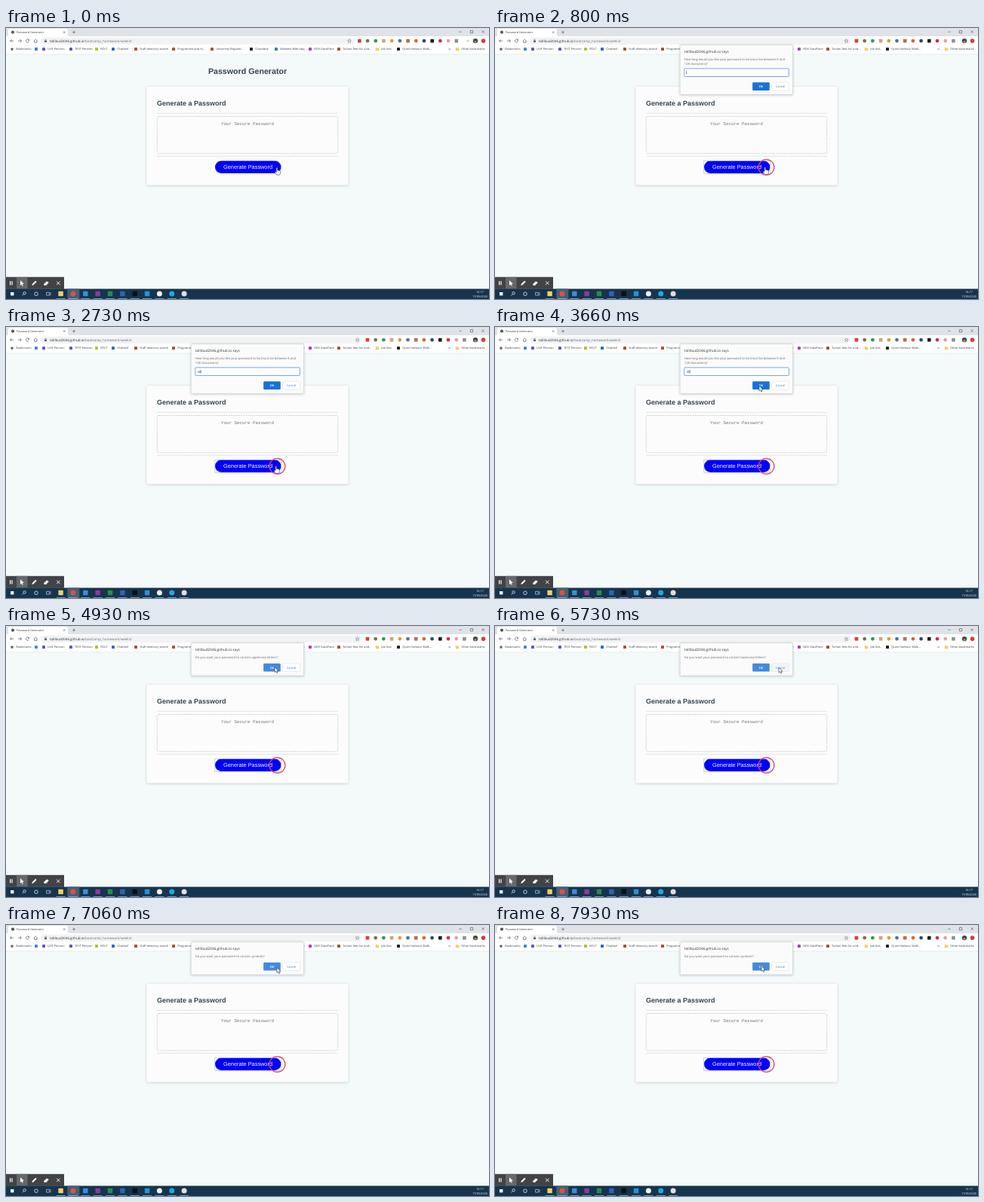
These frames come from a looping animation (640x360 px, 8 s). An HTML page:

```html
<!DOCTYPE html>
<html lang="en">
<head>
<meta charset="utf-8">
<title>Password Generator</title>
<style>
html, body { margin: 0; width: 100%; height: 100%; overflow: hidden; background: #f4f9fa; }
svg { display: block; width: 100vw; height: 100vh; text-rendering: geometricPrecision; }
text { font-family: "Open Sans", "Noto Sans", sans-serif; }
.arial { font-family: "Liberation Sans", Arial, sans-serif; }
.mono { font-family: "Liberation Mono", monospace; }
</style>
</head>
<body>
<svg id="stage" viewBox="0 0 640 360" xmlns="http://www.w3.org/2000/svg">
  <defs>
    <filter id="soft" x="-10%" y="-15%" width="120%" height="140%">
      <feDropShadow dx="0" dy="0.7" stdDeviation="1.6" flood-color="#33444c" flood-opacity=".28"/>
    </filter>
  </defs>
  <rect width="640" height="360" fill="#f4f9fa"/>
  <g id="page">
    <text class="arial" x="320" y="61" font-size="10.67" font-weight="700" text-anchor="middle" fill="#35434d">Password Generator</text>
    <rect x="186.5" y="78" width="267" height="130.5" rx="1.6" fill="#fcfcfc" filter="url(#soft)"/>
    <text class="arial" x="200" y="103" font-size="9" font-weight="700" fill="#35434d">Generate a Password</text>
    <path d="M200 113.3H440M200 170.3H440" stroke="#cdd2d5" stroke-width=".6"/>
    <rect x="200.3" y="117.5" width="239.4" height="49.2" rx="2" fill="#fcfcfc" stroke="#b9bdc0" stroke-width=".7" stroke-dasharray="2 1.3"/>
    <text class="mono" x="320" y="128.7" font-size="5.85" text-anchor="middle" fill="#747474">Your Secure Password</text>
    <rect x="277" y="176.5" width="87.5" height="16.5" rx="8.25" fill="#0000fa"/>
    <text class="arial" x="320.5" y="187.2" font-size="7.36" text-anchor="middle" fill="#fff">Generate Password</text>
    <g id="press" fill="none">
      <rect x="276.8" y="176.3" width="88" height="17" stroke="#9dbbe8" stroke-width=".6"/>
      <circle cx="359.5" cy="185" r="10.4" stroke="#e2485c" stroke-width="1.3"/>
    </g>
  </g>
  <g id="browser">
    <rect width="640" height="11.5" fill="#dfe2e7"/>
    <path d="M1 11.5Q3 11.5 3 9V3Q3 1 5 1H80Q82 1 82 3V9Q82 11.5 84 11.5Z" fill="#fff"/>
    <rect y="11" width="640" height="23.7" fill="#fff"/>
    <path d="M0 34.8H640" stroke="#dfe2e4" stroke-width=".6"/>
    <circle cx="9" cy="5.6" r="2.1" fill="#53585d"/>
    <text x="14" y="7.1" font-size="3.8" fill="#3c4043">Password Generator</text>
    <path d="M76 4.4l2.4 2.4m0-2.4l-2.4 2.4M90 3.7v3.8M88.1 5.6h3.8M600.3 5.2h3.4M615.4 3.5h3.3v3.3h-3.3zM630.5 3.4l3.3 3.3m0-3.3l-3.3 3.3" fill="none" stroke="#4b4f53" stroke-width=".6"/>
    <rect id="omnibox" x="46" y="12.4" height="9.5" rx="4.75" fill="#f1f3f4"/>
    <path d="M10 17H5.5m2-2l-2 2 2 2M16 17h4.5m-2-2l2 2-2 2M30.3 15.8a2.1 2.1 0 1 0 .2 2M30.6 14.8v1.6H29M37 17.2l2.3-2.2 2.3 2.2M37.7 16.7v2.6h3.2v-2.6" fill="none" stroke="#5f6368" stroke-width=".75"/>
    <rect x="51" y="16.4" width="3" height="2.6" rx=".3" fill="#5f6368"/>
    <path d="M51.7 16.5v-.7a.8 .8 0 0 1 1.6 0v.7" fill="none" stroke="#5f6368" stroke-width=".5"/>
    <text x="58" y="18.6" font-size="4.45" fill="#6b7075"><tspan fill="#2b2e31">tollibud2046.github.io</tspan>/bootcamp_homework/week3/</text>
    <g id="tools"></g>
    <circle id="extra" cx="612" cy="17.1" r="1.6" fill="#d0d3d5"/>
    <circle cx="622" cy="17.1" r="3.2" fill="#3f4a3c"/>
    <ellipse cx="622" cy="18.5" rx="1.5" ry="1.4" fill="#a39a7d"/>
    <circle cx="632.5" cy="17.1" r="2.8" fill="#d93c32"/>
    <g id="bookmarks"></g>
    <path d="M586.4 27l1 1-1 1m1.5-2l1 1-1 1" fill="none" stroke="#555" stroke-width=".5"/>
  </g>
  <g id="recorder">
    <rect y="330.8" width="77" height="16" fill="#424346"/>
    <rect x="14" y="330.8" width="14.5" height="16" fill="#66686b"/>
    <path d="M5 336.3h1.2v5.2H5zM7.4 336.3h1.2v5.2H7.4zM19 335.3v6.6l1.7-1.5 1.1 2.3 1-.5-1.1-2.2h2.2zM34.3 342l.6-2 4.3-4.2 1.4 1.4-4.3 4.2zM50 340.3l4-3.7 2.8 1.4-3.6 4-2.5.1z" fill="#fff"/>
    <path d="M67 336.6l4.6 4.6m0-4.6l-4.6 4.6" stroke="#fff" stroke-width=".9"/>
  </g>
  <g id="taskbar">
    <rect y="346.5" width="640" height="13.5" fill="#16344d"/>
    <rect x="81.3" y="346.5" width="16" height="13.5" fill="#456076"/>
    <rect x="6" y="351" width="4.4" height="4.4" fill="#f2f6f8"/>
    <g fill="none" stroke="#e8eef2" stroke-width=".8">
      <circle cx="24.6" cy="352.3" r="1.7"/><path d="M23.3 353.6l-1.7 1.8"/>
      <circle cx="40" cy="353.2" r="2.3"/>
      <path d="M53.6 351.3h3.8v3.8h-3.8zM59 351v4.5" stroke-width=".6"/>
    </g>
    <g id="apps"></g>
    <g font-size="3.75" fill="#fff" text-anchor="middle">
      <text x="628" y="351.9">16:17</text><text x="628" y="357.6">17/05/2020</text>
    </g>
  </g>
  <g id="dialog">
    <rect id="sheet" x="245.2" y="22.6" width="149.4" rx="1" fill="#fbfbfb" stroke="#bdc0c2" stroke-width=".5" filter="url(#soft)"/>
    <text x="250.8" y="33.3" font-size="4.73" fill="#303336">tollibud2046.github.io says</text>
    <g font-size="4.08" fill="#63676b"><text id="line1" x="250.8" y="42.7"/><text id="line2" x="250.8" y="49.2"/></g>
    <g id="field">
      <rect x="250.8" y="53.9" width="138.6" height="10.6" rx=".8" fill="#fff" stroke="#6b9fdc" stroke-width=".9"/>
      <text id="typed" x="253.4" y="60.5" font-size="4.1" fill="#333"/>
      <path id="caret" d="M0 56.8v4.6" stroke="#222" stroke-width=".5"/>
    </g>
    <g id="buttons" font-size="4" font-weight="600" text-anchor="middle">
      <rect id="ok" x="341.2" width="22.6" height="10.8" rx="1.1"/>
      <text x="352.5" y="6.9" fill="#fff">OK</text>
      <rect id="cancel" x="366.8" width="22.5" height="10.8" rx="1.1" stroke="#dadce0" stroke-width=".5"/>
      <text x="378" y="6.9" fill="#3f7fc9" font-weight="400">Cancel</text>
    </g>
  </g>
  <g id="cursor" fill="#fff" stroke="#1b1b1b" stroke-width=".55" stroke-linejoin="round">
    <path id="hand" d="M-.8 .6Q0-.5 .8 .6V4Q1.6 3.3 2.1 4.2 2.9 3.6 3.4 4.5 4.3 4.1 4.6 5V7.2L3.8 9.8H-.5L-2.9 6.3Q-2.9 5.2-1.7 5.6L-.8 6.5Z"/>
    <path id="arrow" d="M0 0V7L1.6 5.5 2.8 8 4 7.4 2.9 5.1H5Z"/>
  </g>
</svg>
<script>
const $ = id => document.getElementById(id);
const NS = "http://www.w3.org/2000/svg";
const LOOP = 8000, OPEN = 800;

function add(parent, tag, attrs, label = "") {
  const el = document.createElementNS(NS, tag);
  for (const key in attrs) el.setAttribute(key, attrs[key]);
  el.textContent = label;
  return parent.appendChild(el);
}
const dot = (parent, x, y, r, fill) => add(parent, "circle", { cx: x, cy: y, r, fill });
const box = (parent, x, y, size, fill) =>
  add(parent, "rect", { x: x - size / 2, y: y - size / 2, width: size, height: size, rx: .4, fill });
const show = (id, on) => $(id).setAttribute("visibility", on ? "inherit" : "hidden");
const set = (id, key, value) => $(id).setAttribute(key, value);

// icon x, icon colour, label
const bookmarks = [
  [8, "#4d5256", "Bookmarks"], [40, "#3f86d8", ""], [50, "#5560b8", "LIVE Pennon"],
  [86, "#5560b8", "TEST Pennon"], [120, "#b7bd35", "ROLT"], [142, "#3067c8", "Chatleaf"],
  [172, "#a3513f", "Staff directory search"], [222, "#a3513f", "Programme and m..."],
  [273, "#a3513f", "University Regulati..."], [325, "#252525", "Classdeck"],
  [358, "#3779c5", "Mailnest Web App"], [403, "#a547a8", "NDV DataPane"],
  [441, "#a3513f", "Tuition fees for und..."], [492, "#f2cf68", "Job lists"],
  [520, "#222", "Quiet Harbour Walk..."], [598, "#f2cf68", "Other bookmarks"]
];
bookmarks.forEach(([x, fill, label], i) => {
  if (!i) {
    add($("bookmarks"), "path", { d: "M8 25.6l.7 1.6 1.8.1-1.4 1.2.5 1.8-1.6-1-1.6 1 .5-1.8-1.4-1.2 1.8-.1z", fill });
  } else if (fill === "#f2cf68") {
    add($("bookmarks"), "path", { d: `M${x - 2.2} 26h1.8l.6.6h2.2v3.6h-4.6z`, fill });
  } else box($("bookmarks"), x, 28, 4, fill);
  add($("bookmarks"), "text", { x: x + 5.2, y: 29.4, "font-size": 3.85, fill: "#3c4043" }, label);
});

add($("tools"), "path", {
  d: "M455 14.7l.7 1.6 1.8.1-1.4 1.2.5 1.8-1.6-1-1.6 1 .5-1.8-1.4-1.2 1.8-.1z",
  fill: "none", stroke: "#60656a", "stroke-width": .5
});
["#e23b35", "#6b7a3d", "#2a9c56", "#d6a07a", "#e79a32", "#5b6f94", "#b76d55",
 "#e1622f", "#264a75", "#191c22", "#d82848", "#e8a0a0", "#8d9195"].forEach((fill, i) => {
  const x = 468.4 + i * 10.7;
  i % 3 ? dot($("tools"), x, 17.1, 2.4, fill) : box($("tools"), x, 17.1, 4.6, fill);
});

["#f3cf67", "#dc5145", "#3b8ed8", "#8a3c9c", "#2a8a50", "#2d65b4", "#0c0f12",
 "#2b91d7", "#f1f1f1", "#22a7e2", "#e6dcdc"].forEach((fill, i) => {
  const x = 72.6 + i * 16.35;
  i === 1 || i > 7 ? dot($("apps"), x, 353, 3.5, fill) : box($("apps"), x, 353, 6.4, fill);
  add($("apps"), "path", { d: `M${x - 6} 359.5h12`, stroke: "#80b6dc", "stroke-width": .8 });
});

const dialogs = [
  [OPEN, "How long would you like your password to be (must be between 8 and"],
  ...[[4100, "uppercase letters"], [5100, "lowercase letters"], [6000, "numbers"], [6700, "symbols"]]
    .map(([t, kind]) => [t, `Do you want your password to contain ${kind}?`])
];

// time, x, y of the pointer tip
const path = [
  [0, 359, 185.2], [600, 357.8, 184.6], [3000, 357.8, 184.6], [3560, 350, 78],
  [4150, 350, 78], [4780, 356, 54.5], [5150, 356, 54.5], [5650, 376, 55],
  [5980, 376, 55], [6480, 357, 55.5], [6800, 359, 56.5], [7400, 359, 56.5],
  [7740, 353, 54.5], [LOOP, 353, 54.5]
];
function pointer(t) {
  const i = path.findIndex(key => key[0] > t);
  const [t0, x0, y0] = path[i - 1], [t1, x1, y1] = path[i];
  const u = (t - t0) / (t1 - t0), e = u * u * (3 - 2 * u);
  return [x0 + (x1 - x0) * e, y0 + (y1 - y0) * e];
}

function draw(t) {
  const open = t >= OPEN;
  const [x, y] = pointer(t);
  show("press", t >= 700);
  show("dialog", open);
  show("extra", !open);
  set("tools", "transform", `translate(${open ? 10.6 : 0} 0)`);
  set("omnibox", "width", open ? 425 : 414.4);

  if (open) {
    const step = dialogs.findLastIndex(d => t >= d[0]);
    const prompt = step === 0;
    const top = prompt ? 72.3 : 49.7;
    $("line1").textContent = dialogs[step][1];
    $("line2").textContent = prompt ? "128 characters)?" : "";
    set("sheet", "height", prompt ? 65.8 : 43.4);
    set("buttons", "transform", `translate(0 ${top})`);
    set("ok", "fill", prompt ? "#1972d8" : "#428ade");
    const overCancel = x > 366.8 && x < 389.3 && y > top && y < top + 10.8;
    set("cancel", "fill", overCancel ? "#f1f6fd" : "#fff");

    const typed = t < 2400 ? "" : t < 2600 ? "3" : "30";
    const since = t < 2400 ? OPEN : t < 2600 ? 2400 : 2600;
    show("field", prompt);
    $("typed").textContent = typed;
    set("caret", "transform", `translate(${253.6 + typed.length * 2.34} 0)`);
    show("caret", prompt && Math.floor((t - since) / 500) % 2 === 0);
  }

  const onButton = y > 176;
  show("hand", onButton);
  show("arrow", !onButton);
  set("cursor", "transform", `translate(${x} ${y})`);
}

const start = performance.now();
function tick() {
  draw((performance.now() - start) % LOOP);
  requestAnimationFrame(tick);
}
tick();
</script>
</body>
</html>
```
